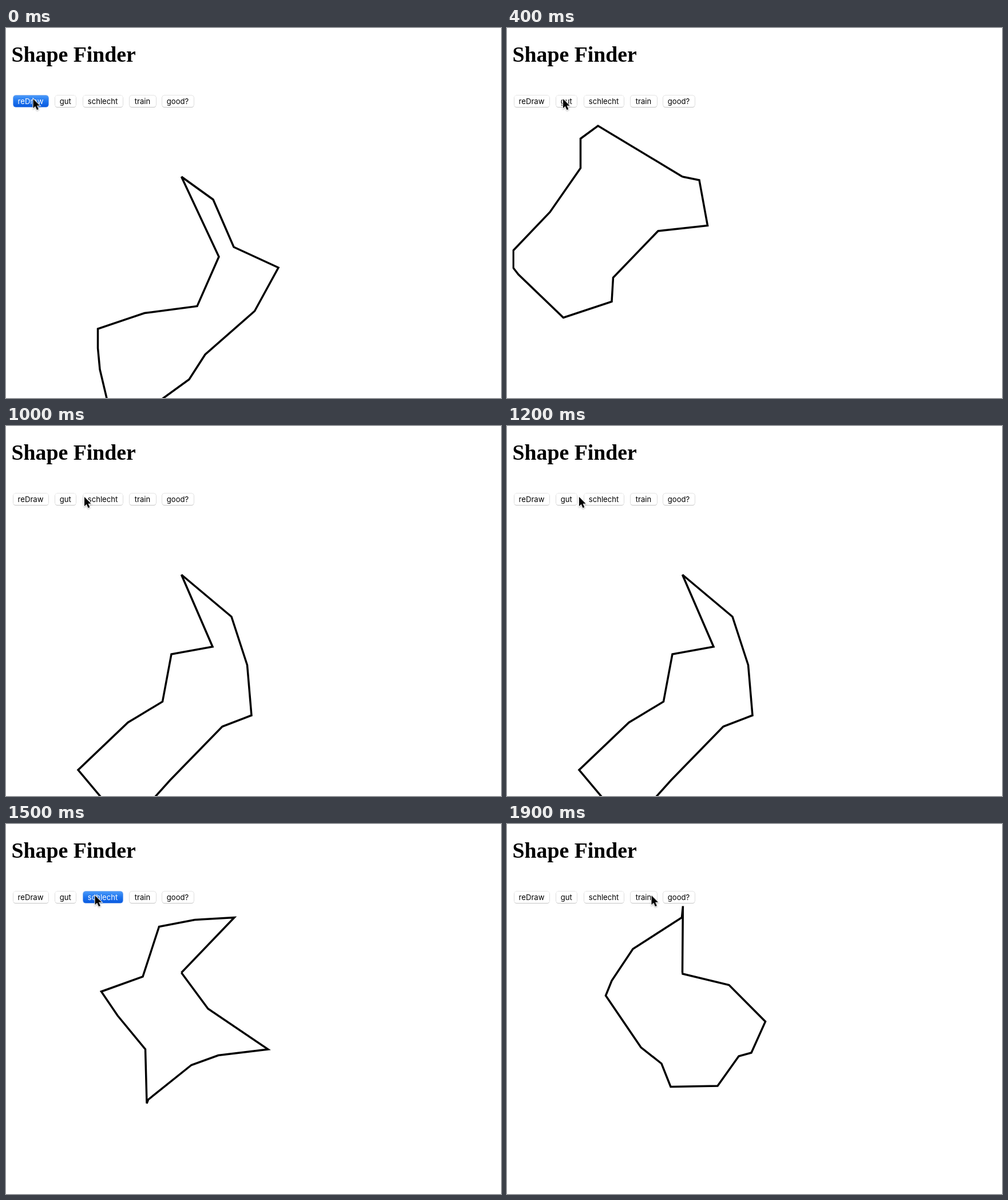
An HTML page for the animation above (2 s loop, 865 by 647 pixels).

```html
<!DOCTYPE html>
<html lang="en">
<head>
<meta charset="utf-8">
<title>Shape Finder</title>
<style>
  html, body { margin: 0; width: 100%; height: 100%; overflow: hidden; background: #fff; }
  h1 {
    position: absolute; left: 9.5px; top: 25px; margin: 0;
    font: bold 37.8px/43px "Liberation Serif", serif; white-space: nowrap;
  }
  .button {
    position: absolute; top: 118px; height: 20px; border-radius: 4px;
    font: 13.1px/20px Inter, sans-serif; text-align: center; white-space: nowrap;
    color: #000; background: #fff;
    box-shadow: 0 0 0 .6px #cacaca, 0 1px 1px #c4c4c4;
  }
  svg { position: absolute; left: 0; top: 0; width: 865px; height: 647px; }
  polyline { fill: none; stroke: #000; stroke-width: 3.5; stroke-miterlimit: 3.5; visibility: hidden; }
  .button, polyline, .cursor { animation: 2s step-end infinite; }

  /* Each step of the loop lasts 5% = 100 ms. */
  .shape1 { animation-name: shape1; }
  .shape2 { animation-name: shape2; }
  .shape3 { animation-name: shape3; }
  .shape4 { animation-name: shape4; }
  .shape5 { animation-name: shape5; }
  .shape6 { animation-name: shape6; }
  .shape7 { animation-name: shape7; }
  @keyframes shape1 { 0% { visibility: visible } 5%, 100% { visibility: hidden } }
  @keyframes shape2 { 5% { visibility: visible } 0%, 30%, 100% { visibility: hidden } }
  @keyframes shape3 { 30% { visibility: visible } 0%, 45%, 100% { visibility: hidden } }
  @keyframes shape4 { 45% { visibility: visible } 0%, 65%, 100% { visibility: hidden } }
  @keyframes shape5 { 65% { visibility: visible } 0%, 75%, 100% { visibility: hidden } }
  @keyframes shape6 { 75% { visibility: visible } 0%, 80%, 100% { visibility: hidden } }
  @keyframes shape7 { 0% { visibility: hidden } 80%, 100% { visibility: visible } }

  :root {
    --blue: linear-gradient(#4b9af9, #1d74ee 50%, #0a5be0);
    --white: linear-gradient(#fff, #fff);
    --edge: 0 0 0 .6px #cacaca, 0 1px 1px #c4c4c4;
    --blue-edge: 0 0 0 .6px #2a72e0;
  }
  .redraw { animation-name: press-redraw; }
  .gut { animation-name: press-gut; }
  .schlecht { animation-name: press-schlecht; }
  @keyframes press-redraw {
    0% { color: #fff; background: var(--blue); box-shadow: var(--blue-edge) }
    5%, 100% { color: #000; background: var(--white); box-shadow: var(--edge) }
  }
  @keyframes press-gut {
    25%, 40%, 70% { color: #fff; background: var(--blue); box-shadow: var(--blue-edge) }
    0%, 30%, 45%, 75%, 100% { color: #000; background: var(--white); box-shadow: var(--edge) }
  }
  @keyframes press-schlecht {
    55%, 75% { color: #fff; background: var(--blue); box-shadow: var(--blue-edge) }
    0%, 60%, 80%, 100% { color: #000; background: var(--white); box-shadow: var(--edge) }
  }

  .cursor { animation-name: point; filter: drop-shadow(0 1.5px 1.2px rgba(0, 0, 0, .3)); }
  @keyframes point {
    0%, 5% { transform: translate(47.5px, 124px) }
    10% { transform: translate(63px, 124px) }
    15% { transform: translate(86px, 124px) }
    20% { transform: translate(98px, 124px) }
    25% { transform: translate(103px, 124px) }
    30% { transform: translate(108px, 124px) }
    35%, 40% { transform: translate(111px, 124px) }
    45% { transform: translate(122px, 124px) }
    50% { transform: translate(137px, 124px) }
    55% { transform: translate(145px, 124px) }
    60% { transform: translate(126px, 124px) }
    65% { transform: translate(107.5px, 125px) }
    70% { transform: translate(110px, 125px) }
    75% { transform: translate(155.5px, 125px) }
    80% { transform: translate(162px, 125px) }
    85% { transform: translate(195px, 125px) }
    90% { transform: translate(234px, 125px) }
    95%, 100% { transform: translate(252.5px, 125px) }
  }
</style>
</head>
<body>
<h1>Shape Finder</h1>
<div class="button redraw" style="left:12.5px;width:61px">reDraw</div>
<div class="button gut" style="left:85.5px;width:36.5px">gut</div>
<div class="button schlecht" style="left:134.5px;width:69px">schlecht</div>
<div class="button" style="left:215.5px;width:46px">train</div>
<div class="button" style="left:272.5px;width:55px">good?</div>
<svg viewBox="0 0 865 647">
  <clipPath id="board"><path d="M9.5 143.5H865V647H9.5Z"/></clipPath>
  <g clip-path="url(#board)">
    <polyline class="shape1" points="306.5,260 362,300 398,383 476,419 434.5,495 348,571 320,614.5 260,658 178.5,658 164,597 160.5,560 160.5,526 242,498.5 334,486.5 372,400 306.5,260"/>
    <polyline class="shape2" points="306.5,260 336,266 350.5,345.5 264,355 185.5,436.5 183,478.5 98.5,506.5 20,431 11,419.5 11,389 75,322 128.5,245 128.5,193.5 159,171 306.5,260"/>
    <polyline class="shape3" points="306.5,260 317,326 333.5,364.5 387.5,379.5 306.5,448.5 227,541 172,571 134.5,586.5 106,582.5 84.5,498 34.5,447.5 78.5,356 148,332.5 196,318 246,248 306.5,260"/>
    <polyline class="shape4" points="306.5,260 394,333.5 421.5,418 429,506 378,525.5 287,619 252,658 173.5,658 126,601.5 213,518.5 273.5,482 289,399 361,386 306.5,260"/>
    <polyline class="shape5" points="306.5,260 388.5,303.5 463,383 478.5,459.5 445.5,549.5 365,638.5 309,657 217,657 187,636 130.5,545 118,486 193,456 264,383.5 345,370 416.5,335.5 306.5,260"/>
    <polyline class="shape6" points="306.5,260 353,323 458,394 371,404.5 324,421.5 248.5,482 246,488.5 243.5,394 195,335 166.5,293 239,267 267.5,179.5 330,167.5 399,163.5 306.5,260"/>
    <polyline class="shape7" points="306.5,260 307,262 388,281.5 451.5,345.5 427,400 405,406 368,458 286,459.5 270,419 234,390.5 172.5,300 183,274 220,218.5 305.5,163.5 309,128 307.5,128 306.5,260"/>
  </g>
  <path class="cursor" d="M0 0V16.2L3.7 12.7 6.6 19.2 9.4 18 6.6 11.7H11.6Z" stroke="#fff" stroke-width="2" paint-order="stroke"/>
</svg>
</body>
</html>
```
